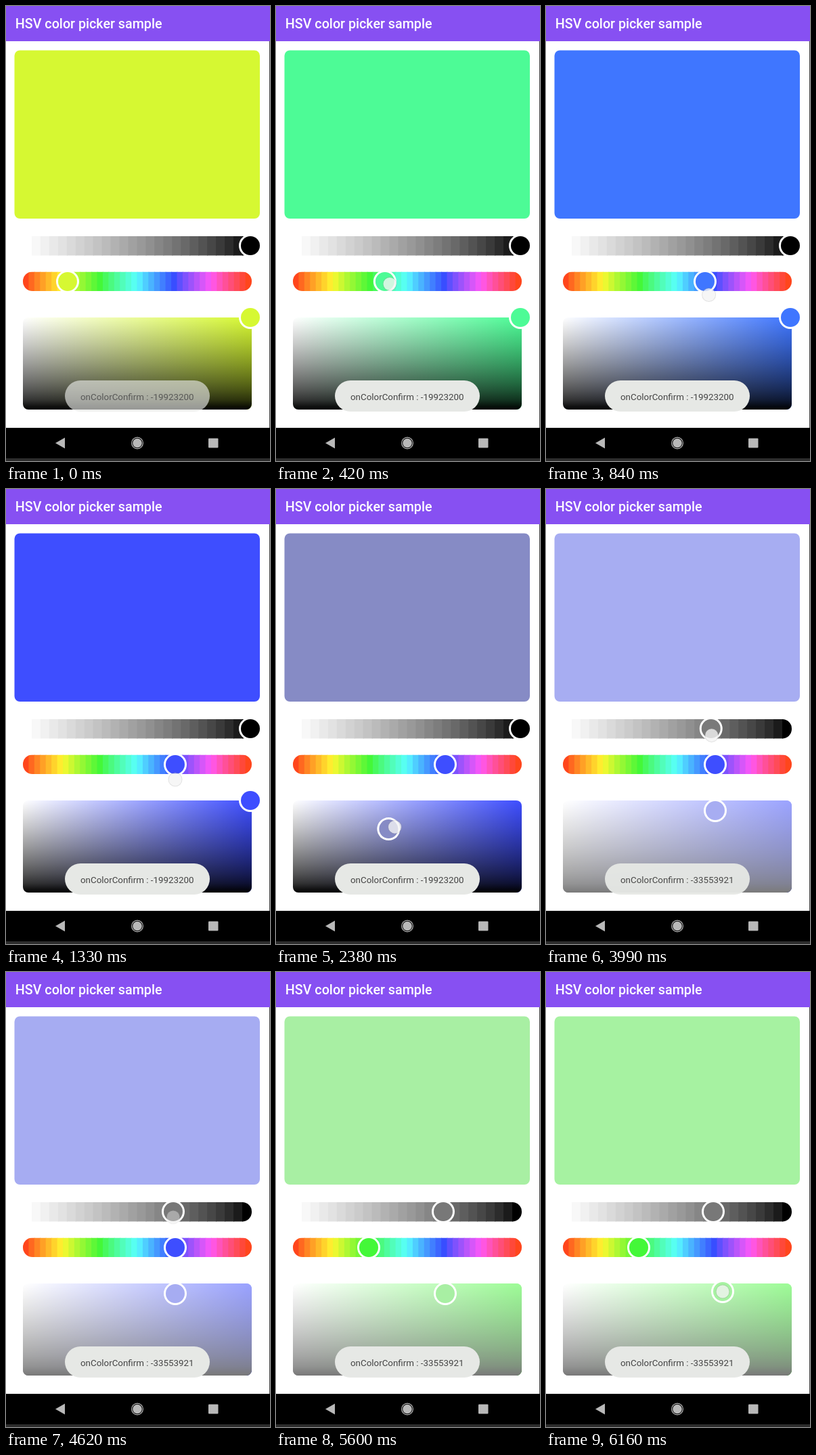
Animation, 390 px wide and 672 px high, one loop 6230 ms. Source, as an HTML page with a canvas:

```html
<!DOCTYPE html>
<html lang="en">
<head>
<meta charset="utf-8">
<title>HSV color picker sample</title>
<style>
html, body { margin: 0; width: 100%; height: 100%; overflow: hidden; background: #fff; }
canvas { display: block; }
</style>
</head>
<body>
<canvas id="stage" width="390" height="672"></canvas>
<script>
const ctx = document.getElementById('stage').getContext('2d');
const LOOP = 6230, STEP = 70, FADE = 70, LEAD = 40;
const LEFT = 25, WIDTH = 337, PANEL_TOP = 460, PANEL_HEIGHT = 136;
const WHITE = [255, 255, 255], BLACK = [0, 0, 0], ICON = '#b9b9b9';

const knobs = {
  hue: { x: 91, y: 407 },
  alpha: { x: 361, y: 354 },
  shade: { x: 361, y: PANEL_TOP }
};

// The finger visits each point of a path in `leg` ms and then rests until `lift`.
const drags = [
  { knob: 'hue', start: 140, leg: 420, lift: 1400, path: [[180, 411], [250, 429]] },
  { knob: 'shade', start: 1680, leg: 600, lift: 2800, path: [[142, 510], [250, 475]] },
  { knob: 'alpha', start: 2940, leg: 620, lift: 4585, path: [[230, 374], [247, 362]] },
  { knob: 'hue', start: 4870, leg: 520, lift: 5430, path: [[137, 411]] },
  { knob: 'shade', start: 5720, leg: 440, lift: LOOP, path: [[261, 472]] }
];

const RED = [255, 70, 28], YELLOW = [255, 248, 48], GREEN = [68, 248, 56],
  CYAN = [88, 255, 255], BLUE = [56, 78, 255], MAGENTA = [255, 88, 248];
const hues = [RED, YELLOW, GREEN, CYAN, BLUE, MAGENTA, RED];

const clamp = v => Math.max(0, Math.min(1, v));
const mix = (a, b, k) => a.map((v, i) => v + (b[i] - v) * k);
const css = c => `rgb(${c.map(Math.round).join()})`;
const easeOut = k => 1 - Math.pow(1 - k, 1.4);
const opacity = (a, power = .7) => 1 - Math.pow(1 - a, power);
const grayOf = a => mix(WHITE, BLACK, opacity(a));
const along = x => clamp((x - LEFT) / (WIDTH - 1));

function hueColor(k) {
  const i = Math.min(5, Math.floor(k * 6));
  return mix(hues[i], hues[i + 1], Math.pow(k * 6 - i, .88));
}

// Where the finger holds a knob at time t.
function position(name, t) {
  let point = [knobs[name].x, knobs[name].y];
  for (const d of drags.filter(d => d.knob === name))
    d.path.forEach((target, i) => {
      point = mix(point, target, easeOut(clamp((t - d.start) / d.leg - i)));
    });
  return point;
}

function rounded(x, y, w, h, r) {
  ctx.beginPath();
  ctx.roundRect(x, y, w, h, r);
}

function box(x, y, w, h, r, fill) {
  ctx.fillStyle = fill;
  rounded(x, y, w, h, r);
  ctx.fill();
}

function disc(x, y, r, fill) {
  ctx.fillStyle = fill;
  ctx.beginPath();
  ctx.arc(x, y, r, 0, 7);
  ctx.fill();
}

function label(text, x, y, font, fill) {
  ctx.font = font + ' Roboto, sans-serif';
  ctx.fillStyle = fill;
  ctx.fillText(text, x, y);
}

function thumb(x, y, color) {
  disc(x, y, 17, '#fff');
  disc(x, y, 14, css(color));
}

function bandedBar(y, count, colorAt) {
  const band = WIDTH / count;
  ctx.save();
  rounded(LEFT, y, WIDTH + 1, 28.5, 14);
  ctx.clip();
  for (let i = 0; i < count; i++) {
    ctx.fillStyle = css(colorAt(i / (count - 1)));
    ctx.fillRect(LEFT + i * band, y, band + 1, 29);
  }
  ctx.restore();
}

function shadePanel(hue, alpha) {
  const across = ctx.createLinearGradient(LEFT, 0, LEFT + WIDTH, 0);
  across.addColorStop(0, '#fff');
  across.addColorStop(1, css(hue));
  const down = ctx.createLinearGradient(0, PANEL_TOP, 0, PANEL_TOP + PANEL_HEIGHT);
  for (let i = 0; i <= 10; i++)
    down.addColorStop(i / 10, `rgba(0,0,0,${opacity(i / 10)})`);
  for (const fill of [across, down, `rgba(255,255,255,${1 - opacity(alpha)})`])
    box(LEFT, PANEL_TOP, WIDTH + 1, PANEL_HEIGHT, 8, fill);
}

function chrome() {
  box(0, 0, 390, 672, 0, '#fff');
  box(389, 52, 1, 620, 0, '#444');
  box(0, 0, 390, 52, 0, '#8750f2');
  label('HSV color picker sample', 13.8, 33, '500 19.7px', '#fff');

  box(0, 623, 390, 45, 0, '#000');
  box(0, 668, 390, 4, 0, '#2c2c2c');
  ctx.fillStyle = ICON;
  ctx.beginPath();
  ctx.moveTo(73, 645.5);
  ctx.lineTo(87, 637.5);
  ctx.lineTo(87, 653.5);
  ctx.fill();
  disc(194, 645.5, 9, ICON);
  disc(194, 645.5, 7.8, '#000');
  disc(194, 645.5, 6.8, ICON);
  box(299, 638.5, 14.5, 14, 1, ICON);
}

function toast(t) {
  const swap = 3750;
  const shown = t < 1000 ? clamp(.65 + t / 400) : clamp((Math.abs(t - swap) - 30) / 220);
  ctx.globalAlpha = shown;
  box(87, 553, 214, 46, 23, '#e6e8e5');
  ctx.globalAlpha = Math.sqrt(shown);
  label('onColorConfirm : ' + (t < swap ? -19923200 : -33553921), 110, 582, '13.35px', '#444');
  ctx.globalAlpha = 1;
}

function touch(t) {
  const drag = drags.find(d => t > d.start - FADE && t < d.lift + FADE);
  if (!drag) return;
  const shown = .7 * clamp(Math.min(t - drag.start, drag.lift - t) / FADE + 1);
  const [x, y] = position(drag.knob, t + LEAD);
  disc(x, y, 10.5, `rgba(150,150,150,${shown * .4})`);
  disc(x, y, 9.5, `rgba(255,255,255,${shown})`);
}

function draw(t) {
  const [hueX] = position('hue', t);
  const [alphaX] = position('alpha', t);
  const [x, y] = position('shade', t);
  const hue = hueColor(along(hueX));
  const alpha = along(alphaX);
  const value = 1 - (y - PANEL_TOP) / PANEL_HEIGHT;
  const solid = mix(BLACK, mix(WHITE, hue, along(x)), Math.pow(value, .7));
  const color = mix(WHITE, solid, opacity(alpha, .95));

  chrome();
  box(12.5, 65.5, 362.5, 248.5, 8, css(color));
  bandedBar(340, 26, grayOf);
  bandedBar(392.5, 40, hueColor);
  shadePanel(hue, alpha);
  thumb(alphaX, knobs.alpha.y, grayOf(alpha));
  thumb(hueX, knobs.hue.y, hue);
  thumb(x, y, color);
  toast(t);
  touch(t);
}

const start = performance.now();
function frame() {
  const t = (performance.now() - start) % LOOP;
  draw(Math.floor(t / STEP) * STEP);
  requestAnimationFrame(frame);
}
frame();
</script>
</body>
</html>
```
